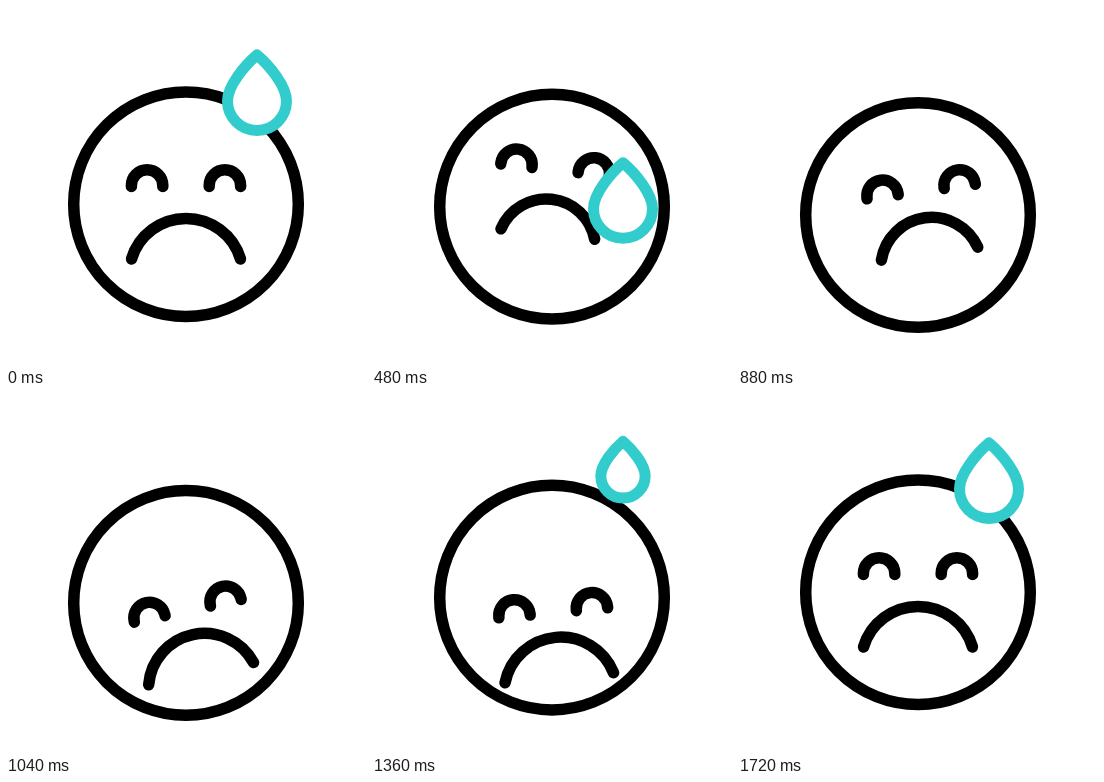
These frames come from a looping animation (360 px wide and 360 px high, 1.76 s). An HTML page:

```html
<!DOCTYPE html>
<html lang="en">
<head>
<meta charset="utf-8">
<title>Sweating sad face</title>
<style>
  html, body { margin: 0; width: 100%; height: 100%; overflow: hidden; background: #fff; }
  svg { display: block; width: 100vw; height: 100vh; }
  path, circle {
    fill: none; stroke: #000; stroke-width: 11.5;
    stroke-linecap: round; stroke-linejoin: round;
    vector-effect: non-scaling-stroke;
  }
  #drop { fill: #fff; stroke: #33cccc; stroke-width: 11; }
</style>
</head>
<body>
<svg viewBox="0 0 360 360">
  <circle id="head" cx="180" cy="198" r="112.3"/>
  <g id="features">
    <path d="M-54.6 1 V0 A15.7 15.7 0 0 1 -23.2 0 V1"/>
    <path d="M23.2 1 V0 A15.7 15.7 0 0 1 54.6 0 V1"/>
    <path id="mouth" d="M-54.5 0 A56.9 56.9 0 0 1 54.5 0"/>
  </g>
  <path id="drop" d="M251 49 C239 59 221.5 80 221.5 95 A29.5 29.5 0 0 0 280.5 95 C280.5 80 263 59 251 49 Z"/>
</svg>
<script>
const LOOP = 1760, STEP = 40;
const FALL_START = 128, FALL_RATE = 0.0295;
const REGROW = 1070, REGROWN = 1500;

const byId = id => document.getElementById(id);
const [head, features, mouth, drop] = ["head", "features", "mouth", "drop"].map(byId);

// Smooth rise from 0 to 1 between two times.
function ease(t, from, to) {
  const u = Math.min(1, Math.max(0, (t - from) / (to - from)));
  return u * u * (3 - 2 * u);
}

// Rises to 1, holds, then returns to 0.
const pulse = (t, rise, top, leave, end) => ease(t, rise, top) - ease(t, leave, end);

function dropTransform(t) {
  if (t < REGROW) {
    const fall = (FALL_RATE * Math.max(0, t - FALL_START)) ** 2;
    return `translate(0 ${fall})`;
  }
  const size = Math.max(0.01, ease(t, REGROW, REGROWN));
  return `translate(251 42.5) scale(${size}) translate(-251 -42.5)`;
}

function draw(t) {
  const sink = pulse(t, 310, 860, 1000, 1720);
  const lookUp = pulse(t, 260, 600, 680, 1120);
  const lookDown = pulse(t, 680, 1120, 1280, 1720);
  const tiltRight = pulse(t, 260, 550, 560, 1020);
  const tiltLeft = pulse(t, 560, 1020, 1020, 1650);

  const x = 180 + 4.4 * lookUp + 1.3 * lookDown;
  const y = 179.5 - 23 * lookUp + 42 * lookDown;
  const tilt = 7.5 * tiltRight - 12 * tiltLeft;
  const mouthY = 73.5 - 11.3 * lookUp - 8 * lookDown;

  head.setAttribute("cy", 198.2 + 10.8 * sink);
  features.setAttribute("transform", `translate(${x} ${y}) rotate(${tilt})`);
  mouth.setAttribute("transform", `translate(0 ${mouthY}) scale(${1 - 0.19 * lookUp})`);
  drop.setAttribute("transform", dropTransform(t));
}

const start = performance.now();
function tick() {
  const t = (performance.now() - start) % LOOP;
  draw(Math.floor(t / STEP) * STEP);
  requestAnimationFrame(tick);
}
tick();
</script>
</body>
</html>
```
